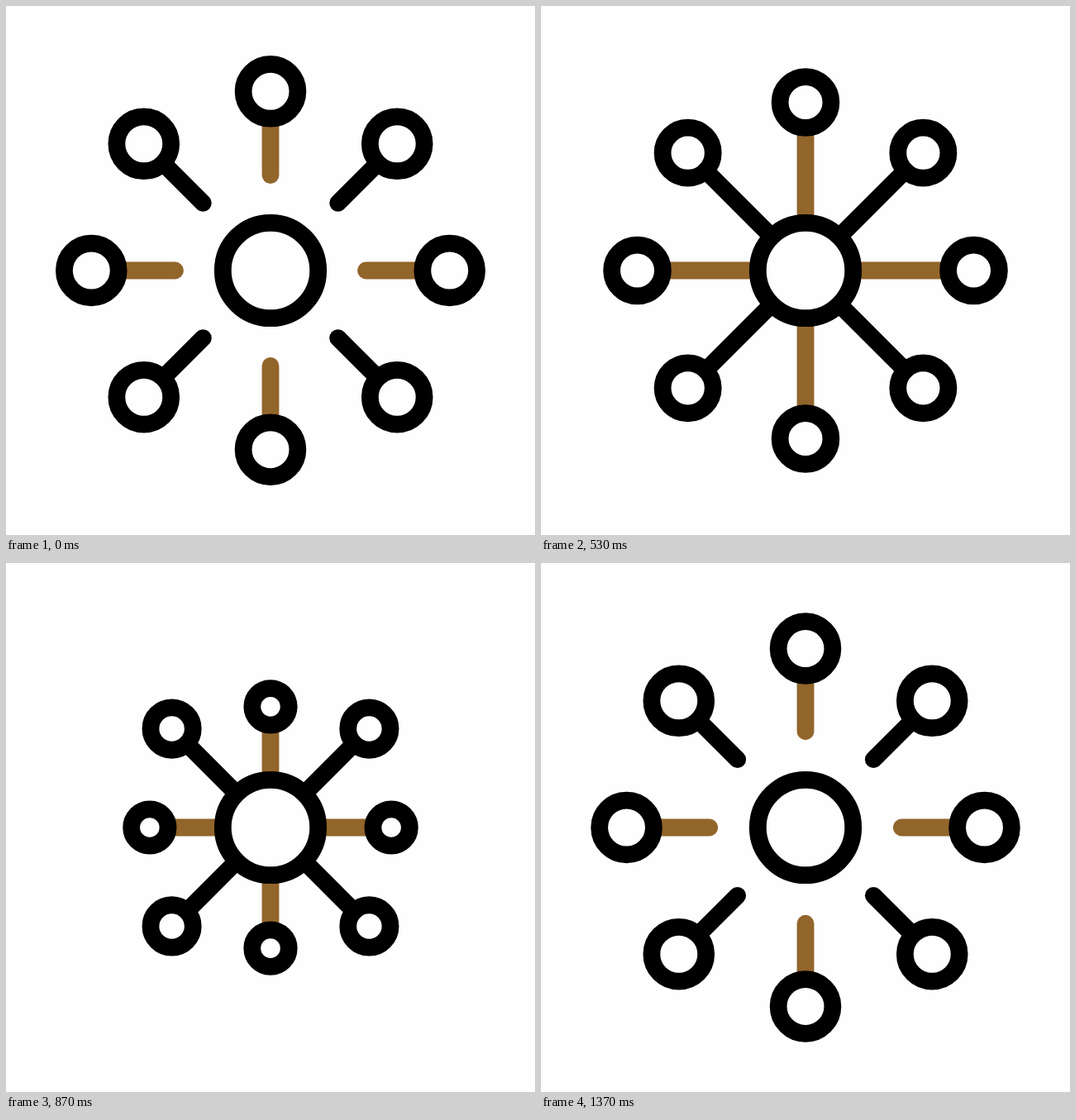
An HTML page with a canvas for the animation above (1670 ms loop, 640 by 640 pixels).

```html
<!DOCTYPE html>
<html lang="en">
<head>
<meta charset="utf-8">
<title>Hub and nodes</title>
<style>
  html, body { margin: 0; width: 100%; height: 100%; overflow: hidden; background: #fefefe; }
  canvas { display: block; width: 640px; height: 640px; }
</style>
</head>
<body>
<canvas id="stage" width="640" height="640"></canvas>
<script>
const ctx = document.getElementById('stage').getContext('2d');

const LOOP = 1670, LAST_FRAME = 41;
const PAPER = '#fefefe', INK = '#000', BROWN = '#92652b';
const STROKE = 20.8, HUB = 57.7;
const NODE_DISTANCE = 216.7, NODE_RADIUS = 32.9;
const GAP_END = 116.4; // inner end of a detached spoke

// Times are in frames at 30 per second.
const TOUCH = { from: -1, to: 12.4 };
const GROUPS = [
  { angle: 0, color: BROWN, squeeze: 0.375, pull: [12.4, 24.1], release: [24.1, 41.6] },
  { angle: Math.PI / 4, color: INK, squeeze: 0.266, pull: [12.4, 21.1], release: [24.3, 36.65] }
];

const clamp = v => Math.min(1, Math.max(0, v));
const progress = (f, from, to) => clamp((f - from) / (to - from));
const mix = (a, b, k) => a + (b - a) * k;
const smooth = t => t * t * (3 - 2 * t);

// Bezier (1/3, 0, 5/6, 5/6): soft start, straight finish.
function easeIn(t) {
  let lo = 0, hi = 1;
  for (let i = 0; i < 24; i++) {
    const u = (lo + hi) / 2;
    if (u + 0.5 * u * u * (1 - u) < t) lo = u; else hi = u;
  }
  return lo * lo * (2.5 - 1.5 * lo);
}
const easeOut = t => 1 - easeIn(1 - t);

function ring(x, y, r) {
  ctx.beginPath();
  ctx.arc(x, y, r, 0, Math.PI * 2);
  ctx.strokeStyle = INK;
  ctx.stroke();
}

function drawGroup(group, frame) {
  const pulled = easeIn(progress(frame, ...group.pull));
  const released = easeOut(progress(frame, ...group.release));
  const scale = 1 - group.squeeze * (pulled - released);
  const touched = smooth(progress(frame, TOUCH.from, TOUCH.to));
  const inner = mix(GAP_END, HUB, touched - released);
  const distance = NODE_DISTANCE * scale, radius = NODE_RADIUS * scale;

  for (let i = 0; i < 4; i++) {
    ctx.save();
    ctx.rotate(group.angle + i * Math.PI / 2);
    ctx.beginPath();
    ctx.moveTo(inner, 0);
    ctx.lineTo(distance - radius, 0);
    ctx.strokeStyle = group.color;
    ctx.stroke();
    ring(distance, 0, radius);
    ctx.restore();
  }
}

function draw(frame) {
  ctx.setTransform(1, 0, 0, 1, 0, 0);
  ctx.fillStyle = PAPER;
  ctx.fillRect(0, 0, 640, 640);
  ctx.translate(320, 320);
  ctx.lineWidth = STROKE;
  ctx.lineCap = 'round';
  GROUPS.forEach(group => drawGroup(group, frame));
  ctx.beginPath();
  ctx.arc(0, 0, HUB, 0, Math.PI * 2);
  ctx.fill();
  ring(0, 0, HUB);
}

const start = performance.now();
function tick() {
  const ms = (performance.now() - start) % LOOP;
  // Frame changes fall on whole hundredths of a second.
  const frame = Math.floor(Math.floor(ms / 10) * 0.3 + 0.15);
  draw(Math.min(frame, LAST_FRAME));
  requestAnimationFrame(tick);
}
tick();
</script>
</body>
</html>
```
